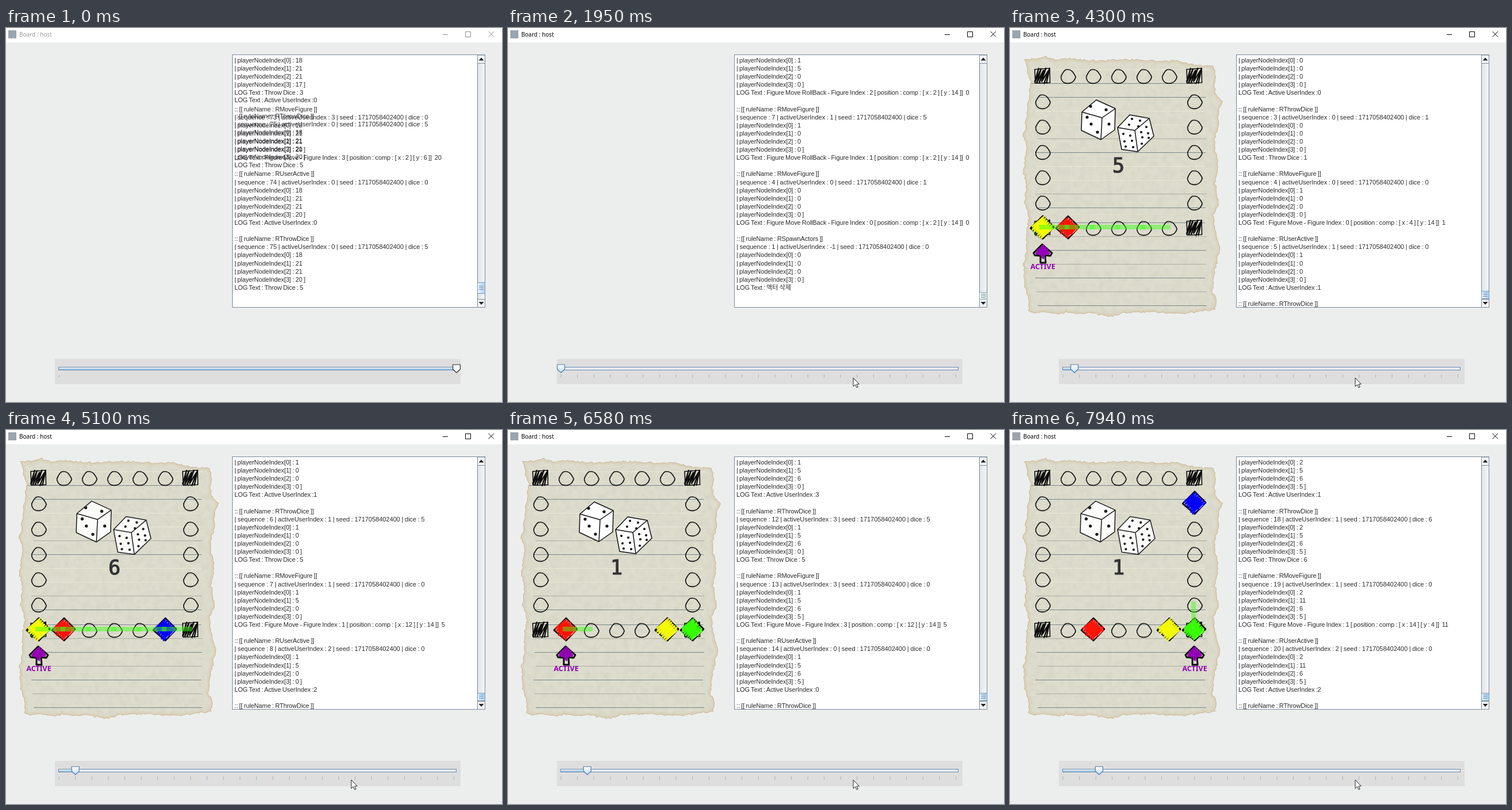
Recreate the animation shown at these times as an HTML page. Size 862 by 650 pixels, loop 8000 ms.

```html
<!DOCTYPE html>
<html lang="en">
<head>
<meta charset="utf-8">
<title>Board : host</title>
<style>
html, body { margin: 0; width: 100%; height: 100%; overflow: hidden; background: #eceeed; }
svg { display: block; width: 862px; height: 650px; }
text { white-space: pre; }
.log text { font: 11px "Liberation Sans", "Noto Sans CJK KR", "Noto Sans CJK", sans-serif; fill: #2c2c30; letter-spacing: -.12px; word-spacing: -.6px; }
.log text.wide { letter-spacing: -.02px; word-spacing: -.4px; }
.title { font: 10px "Noto Sans", "Open Sans", sans-serif; }
.num { font: 35px "DejaVu Sans Mono", monospace; fill: #333; stroke: #333; stroke-width: 1.2; text-anchor: middle; }
.active { font: bold 12.4px "Noto Sans", "Open Sans", sans-serif; fill: #9200b6; text-anchor: middle; }
</style>
</head>
<body>
<svg viewBox="0 0 862 650" xmlns="http://www.w3.org/2000/svg">
  <defs>
    <filter id="grain" x="0" y="0" width="1" height="1">
      <feTurbulence type="fractalNoise" baseFrequency=".09" numOctaves="3" seed="4"/>
      <feColorMatrix values="0 0 0 0 .52  0 0 0 0 .52  0 0 0 0 .44  1.2 0 0 0 -.48"/>
    </filter>
    <clipPath id="logClip"><rect x="394" y="47" width="425" height="438"/></clipPath>
    <clipPath id="paperClip"><path id="paperShape"/></clipPath>
    <linearGradient id="bar"><stop stop-color="#dfe6ec"/><stop offset="1" stop-color="#f3f5f6"/></linearGradient>
    <linearGradient id="blue"><stop stop-color="#eef5fc"/><stop offset="1" stop-color="#b5cfe9"/></linearGradient>
    <linearGradient id="pale"><stop stop-color="#f1f7f6"/><stop offset="1" stop-color="#d5e6e5"/></linearGradient>
    <linearGradient id="knob" x2="0" y2="1"><stop stop-color="#fff"/><stop offset="1" stop-color="#c3daf1"/></linearGradient>
  </defs>
  <rect width="862" height="650" fill="#eceeed"/>
  <rect width="862" height="25" fill="#fff"/>
  <rect x="4" y="4" width="14" height="14" fill="#9aa5ae"/>
  <text id="caption" class="title" x="23" y="15">Board : host</text>
  <path id="buttons" fill="none" d="M759 11.5H768M798.5 6.5H807.5V15.5H798.5ZM838.5 6L848 15.5M848 6L838.5 15.5"/>
  <g id="board"><g id="paper"></g><g id="pieces"></g></g>
  <rect x="393.5" y="46.5" width="439" height="439" fill="#fff" stroke="#7a8a99"/>
  <g id="log" class="log" clip-path="url(#logClip)"></g>
  <g id="smear" class="log"></g>
  <rect x="819.5" y="47" width="13" height="438.5" fill="url(#bar)" stroke="#7a8a99"/>
  <path d="M819.5 47H832.5V61.5H819.5ZM819.5 471.5H832.5V485.5H819.5Z" fill="#f3f5f7" stroke="#7a8a99"/>
  <path d="M821.5 56.5L826 51.5L830.5 56.5ZM821.5 476L826 481L830.5 476Z" fill="#222"/>
  <rect id="gripBox" x="819.5" width="13"/>
  <path id="gripLines" fill="none"/>
  <rect x="85" y="575" width="705" height="44" fill="#dedede"/>
  <rect x="91.5" y="589.5" width="691" height="5" fill="#e6eaee" stroke="#6b8fb3"/>
  <rect id="fill" x="92" y="592" height="2" fill="#9cc2e8"/>
  <path id="ticks" stroke="#9db2c6"/>
  <path id="thumb" d="M-6.5 -6.5H6.5V1.5L0 7.5L-6.5 1.5Z" stroke-width="1.2" stroke-linejoin="round"/>
  <path id="cursor" d="M0 0V15L3.5 11.8L6 17L8.2 16L5.8 11H10.3Z" fill="#fff" stroke="#222"/>
</svg>
<script>
const $ = id => document.getElementById(id);
const LOOP = 8000, LAST = 25;
const colors = ['#fd1408', '#0502fa', '#36ff00', '#f3fb00'];
const rolls = [...'1565161443523121544542335'].map(Number);
// start of each game step, from step 1
const starts = [2220, 2620, 3350, 3420, 3890, 4230, 4630, 4900, 5100, 5430, 5650,
  5920, 6240, 6380, 6510, 6780, 6980, 7130, 7400, 7670, 7930];

function rng(seed) {
  return () => (seed = (seed * 16807) % 2147483647) / 2147483647;
}

// ---- game ----
const turn = seq => Math.floor((seq - 2) / 3);
function nodes(seq) {
  const n = [0, 0, 0, 0];
  for (let k = 0; 4 + 3 * k <= seq; k++) n[k % 4] += rolls[k];
  return n;
}
function cell(n) {
  const r = 2 * (n % 6);
  return [[2 + r, 14], [14, 14 - r], [14 - r, 2], [2, 2 + r]][Math.floor(n / 6) % 4];
}
const spot = n => cell(n).map((c, i) => 22 * c + (i ? 40 : 13));

// ---- log ----
function block(rule, seq, user, dice, at, note) {
  return [`:: [[ ruleName : ${rule} ]]`,
    `| sequence : ${seq} | activeUserIndex : ${user} | seed : 1717058402400 | dice : ${dice}`,
    ...at.map((n, i) => `| playerNodeIndex[${i}] : ${n}${i === 3 ? ' ]' : ''}`),
    `LOG Text : ${note}`, ''];
}
function moveNote(verb, user, n) {
  const [x, y] = cell(n);
  return `Figure ${verb} - Figure Index : ${user} [ position : comp : [ x : ${x} ] [ y : ${y} ]]  ${n}`;
}
function forward(seq) {
  const k = turn(seq), user = k % 4, at = nodes(seq);
  return [
    block('RUserActive', seq, user, 0, at, `Active UserIndex :${user}`),
    block('RThrowDice', seq, user, rolls[k], at, `Throw Dice : ${rolls[k]}`),
    block('RMoveFigure', seq, user, 0, at, moveNote('Move', user, at[user]))
  ][(seq - 2) % 3];
}
function backward(seq) {
  if (seq === 1) return block('RSpawnActors', 1, -1, 0, nodes(0), '액터 삭제');
  const k = turn(seq), user = k % 4, at = nodes(seq - 1);
  return block('RMoveFigure', seq, user, rolls[k], at, moveNote('Move RollBack', user, at[user]));
}
const undo = [...forward(72).slice(2), ...forward(73), ...forward(74), ...forward(75)];
for (let seq = 73; seq > 0; seq -= 3) undo.push(...backward(seq));
undo.push(':: [[ ruleName : RSpawnActors ]]');

const floors = `4beaae15-caac-4770-9627-ae091ae4dca4
90ae83ea-0297-414e-a6c6-82c1847c5f45
92889143-6df5-4171-aacf-5506e6af22cc
402b7582-bbea-4962-8912-9bd9ab025a3a
9c6011ca-f63a-4adb-93ff-31e5e0d9cca7
b3d7a93f-ebc4-4912-b039-7a9827af8f64
d4d8eca6-6695-4dfd-826f-4cff284abcd4
603a7936-f22e-4c70-b73f-8215e9357bff
3a80dc42-a24f-43c7-8f7f-acb47a86d147
15dd5140-5486-4359-af01-3d0a99df69c7
be99e986-29a4-4f62-8156-525be7ce474d
9797038b-9c57-459b-8c25-ab917144956f
a4ce6666-f301-4d88-9ca3-68aa4feb14fa
f735dc34-a070-438b-925b-a68faf9ab9e2
30ba41ac-f486-47cd-b7dd-9344552942f2
5770ebe9-6e82-4356-bafa-beb91185466c
a6599417-c26b-451c-9607-002efaf1311b
09b70294-cbc3-4383-8576-28684bf60338
b42efb1e-48b7-4d5b-839a-d128ccfddde5
59812411-4c68-4c01-ba9b-1650d00088ec`.split('\n').map(id => 'Floor : ' + id);
const play = [...floors,
  'Node : 2592c3cc-aa0e-4e32-afc7-ed545f4a63e0',
  'Figure : 5499daa1-b1cb-405d-ae86-088faade1e31',
  'Figure : 8276ad3d-4a23-4aeb-990a-8549f80a0ffe',
  'Figure : 104d0cd0-f276-49e6-9975-a9383584c1aa',
  'Figure : 519b6738-adf2-420b-8c25-ea9fd047c7ce',
  'Arrow : 446df9ae-b396-4dde-b878-c9cb99e36937',
  'Victory : ba5f48bf-b376-444c-9672-4095af401c35',
  'Dice : c6aea409-1b0a-4786-8a07-fe76521143a6',
  ':: 액터 생성', ''];
for (let seq = 2; seq <= 21; seq++) play.push(...forward(seq));

function line(s, y) {
  const id = /^[A-Z][a-z]+ : /.test(s);
  return `<text x="${id ? 394 : 397}" y="${y.toFixed(1)}"${id || /^\| s/.test(s) ? ' class="wide"' : ''}>${s}</text>`;
}
const rowY = i => 60 + 14.1 * i;

// ---- drawings ----
const pts = list => list.map(p => p.map(v => v.toFixed(1)).join(' ')).join('L');

function tornEdge() {
  const ends = [27,56, 62,50, 80,55, 100,54, 148,57, 205,55, 262,58, 290,57, 308,63, 353,67, 358,85,
    355,100, 358,116, 368,128, 361,150, 362,170, 356,188, 355,212, 362,230, 356,270, 362,310, 352,325,
    356,352, 364,385, 355,422, 352,458, 358,472, 355,489, 300,496, 235,493, 195,495, 175,501, 140,495,
    115,497, 100,493, 85,497, 60,493, 42,496, 33,490, 32,470, 26,450, 24,410, 30,385, 28,360, 33,330,
    26,305, 29,280, 24,250, 30,205, 24,188, 30,150, 36,95, 31,75];
  const rand = rng(77), out = [], n = ends.length / 2;
  for (let i = 0; i < n; i++) {
    const [x, y] = ends.slice(2 * i), j = (i + 1) % n, dx = ends[2 * j] - x, dy = ends[2 * j + 1] - y;
    const m = Math.ceil(Math.hypot(dx, dy) / 4);
    for (let s = 0; s < m; s++)
      out.push([x + dx * s / m + rand() * 3 - 1.5, y + dy * s / m + rand() * 3 - 1.5]);
  }
  return 'M' + pts(out) + 'Z';
}
function paper() {
  const edge = tornEdge();
  $('paperShape').setAttribute('d', edge);
  let s = `<path d="${edge}" fill="#dddccd" stroke="#cdb999" stroke-width="1.4"/><g clip-path="url(#paperClip)">
    <rect x="20" y="45" width="352" height="460" filter="url(#grain)" opacity=".4"/>
    <path d="${edge}" fill="none" stroke="#dacfb4" stroke-width="8" opacity=".5"/></g>`;
  const tone = { l: '#ebe9d6', m: '#a9aea3', d: '#7b8789' };
  [...'lddllmdllmddmdmdmd'].forEach((c, i) => {
    const y = 72.5 + 24 * i + (i > 10 ? 2 : 0);
    s += `<path d="M${i === 1 ? 37 : 44 + i % 3 * 2} ${y}H${i === 1 ? 322 : 342 - i % 4}" stroke="${tone[c]}"/>`;
  });
  for (let n = 0; n < 24; n++) {
    const [x, y] = spot(n);
    s += n % 6 ? `<path transform="translate(${x} ${y + .5})" fill="none" stroke="#111" stroke-width="1.7"
      d="M-4-12C2-13 5-12 8-8C11-4 13-1 13 1C12 6 8 10 4 11C0 12.5-6 12-9 9C-12 6-13 1-12-1C-10-5-8-10-4-12Z"/>` : corner(x - 1, y - 1);
  }
  return s;
}
function corner(x, y) {
  const rand = rng(31), zig = [];
  for (let i = 0; i <= 13; i++)
    zig.push([Math.max(-13, Math.min(13, -14 + 2.1 * i + (i % 2 ? 6 : -4))), (i % 2 ? -12 : 12) + rand() * 5 - 2]);
  return `<g transform="translate(${x} ${y})" fill="none" stroke="#0c0c0c"><path d="M-13-11L13-13L13.5 12L-12 13Z" stroke-width="1.6"/>
    <path d="M${pts(zig)}" stroke-width="2.2"/></g>`;
}
function scribble(size, count, seed) {
  const rand = rng(seed), zig = [];
  for (let i = 0; i <= count; i++) {
    const v = -size + 2 * size * i / count, u = (i % 2 ? 1 : -1) * (size + rand() * 4 - 2);
    zig.push([(u + v) * .71, (v - u) * .71]);
  }
  return 'M' + pts(zig);
}
function figure(user, n) {
  const [x, y] = spot(n);
  return `<g transform="translate(${x - 1} ${y - 1})" fill="none" stroke-linejoin="round">
    <path d="M1-20L20-1L1 19L-20 1Z" stroke="#0c0c0c" stroke-width="2.6"/>
    <path d="M0-13L13 0L0 13L-13 0Z" fill="${colors[user]}"/>
    <path d="${scribble(13.5, 13, 40 + user * 9)}" stroke="${colors[user]}" stroke-width="3.2"/>
    <path d="M9 10L15 3M2 15L6 11" stroke="#eee"/></g>`;
}
function arrow(n) {
  const [x, y] = spot(n);
  return `<g transform="translate(${x} ${y + 44})" fill="none" stroke-linejoin="round">
    <path d="M-1-16L16-1L13 4L4 3L5 16L-4 16L-4 4L-14 3L-16-1Z" stroke="#0c0c0c" stroke-width="3"/>
    <path d="M-1-15L13-1L11 2L3 1L2 10L-2 8L-3 2L-12 2L-13-1Z" fill="#9200b6"/>
    <path transform="translate(0 -4)" d="${scribble(8, 7, 12)}" stroke="#9200b6" stroke-width="3"/></g>
    <text class="active" x="${x}" y="${y + 71}">ACTIVE</text>`;
}
function trail(from, steps) {
  let s = '';
  for (let i = 0; i < steps; i++) {
    const [ax, ay] = spot(from + i), [bx, by] = spot(from + i + 1);
    s += `<rect x="${Math.min(ax, bx) - 6}" y="${Math.min(ay, by) - 6}" width="${Math.abs(bx - ax) + 8}" height="${Math.abs(by - ay) + 8}"/>`;
  }
  return `<g fill="#3cff14" fill-opacity=".48">${s}</g>`;
}
function dice(value, fresh) {
  const dots = (list, r) => list.map(([x, y]) => `<circle cx="${x}" cy="${y}" r="${r}"/>`).join('');
  return `<g stroke-linejoin="round"${fresh ? ' opacity=".93" transform="translate(187 170) scale(1.03) translate(-187 -170)"' : ''}>
    <g fill="#fff" stroke="#111" stroke-width="1.5">
    <path d="M125 146L150 125L183 140L182 177L158 194L124 178Z"/>
    <path d="M187 173L208 151L242 157L250 188L222 215L194 211Z"/>
    <path fill="none" d="M125 146L160 156L183 140M160 156L158 194M187 173L217 178L242 157M217 178L222 215"/></g>
    <g fill="#111">${dots([[140, 136], [167, 142], [134, 155], [141, 167], [152, 181], [172, 167]], 2.6)}
    ${dots([[212, 158], [226, 161], [207, 168], [223, 171], [197, 184], [209, 187], [199, 197], [212, 196], [201, 206], [214, 207],
      [228, 181], [237, 172], [230, 190], [240, 183], [229, 201], [241, 191]], 2.1)}</g></g>
    <text class="num" x="188.5" y="251">${value}</text>`;
}
function pieces(step, fresh) {
  const at = nodes(step), k = turn(step), user = k % 4;
  let s = at.map((n, i) => figure(i, n)).join('');
  if (step < 2) return s;
  s += arrow(at[user]);
  if ((step - 2) % 3 === 1) s += trail(at[user], rolls[k]) + dice(rolls[k], fresh);
  return s;
}

// ---- frame ----
$('paper').innerHTML = paper();
$('smear').innerHTML = undo.slice(20, 29).map((s, i) => line(s, rowY(20 + i) - 213)).join('');
const allTicks = Array.from({ length: 25 }, (_, i) => `M${(92 + 28.6 * i).toFixed(1)} 602V608`).join('');

const attr = (id, set) => Object.entries(set).forEach(([k, v]) => $(id).setAttribute(k, v));
// share done of a change made in nine even steps
const ninths = (t, from) => t < from ? 0 : Math.min(1, (Math.floor((t - from) / 67.5) + 1) / 9);
let shown = '';

function draw(t) {
  const back = Math.round(LAST * ninths(t, 70));
  const step = starts.filter(s => s <= t).length;
  const focus = t >= 1410, glide = ninths(t, 1410);
  const fresh = step > 0 && t - starts[step - 1] < 65;
  const key = [back, step, glide, fresh].join();
  if (key === shown) return;
  shown = key;

  const end = 8 * (step - 2);
  const rows = step > 1 ? play.slice(end, end + 31) : undo.slice(8 * back, 8 * back + 30 + step);
  $('log').innerHTML = rows.map((s, i) => line(s, rowY(i))).join('');
  attr('smear', { visibility: back ? 'hidden' : 'visible' });

  attr('board', { visibility: step ? 'visible' : 'hidden' });
  $('pieces').innerHTML = step ? pieces(step, fresh) : '';

  attr('caption', { fill: focus ? '#000' : '#999' });
  attr('buttons', { stroke: focus ? '#000' : '#8c8c8c' });

  const x = step ? 92 + 2.86 * (step + 1) : 783 - 691 * back / LAST;
  attr('thumb', { transform: `translate(${x.toFixed(1)} 591.5)`, stroke: focus ? '#4f7fae' : '#333', fill: focus ? 'url(#knob)' : '#f1f8fa' });
  attr('fill', { width: Math.max(0, x - 92) });
  attr('ticks', { d: back ? allTicks : 'M92 603V607' });

  const top = step ? 457.5 : Math.round(442 + 17 * back / LAST) + .5, tall = step ? 13 : Math.round(19 - 7 * back / LAST);
  const live = step || !back, mid = Math.round(top + tall / 2) - .5;
  attr('gripBox', { y: top, height: tall, fill: live ? 'url(#blue)' : 'url(#pale)', stroke: live ? '#6f95bd' : '#8aa3a8' });
  attr('gripLines', { d: [-3, 0, 3].map(d => `M822 ${mid + d}H830`).join(''), stroke: live ? '#5f8fc0' : '#7fa0a5' });

  attr('cursor', { visibility: focus ? 'visible' : 'hidden', transform: `translate(${640 - 40 * glide} ${660 - 52 * glide})` });
}

function tick() {
  draw(performance.now() % LOOP);
  requestAnimationFrame(tick);
}
tick();
</script>
</body>
</html>
```
